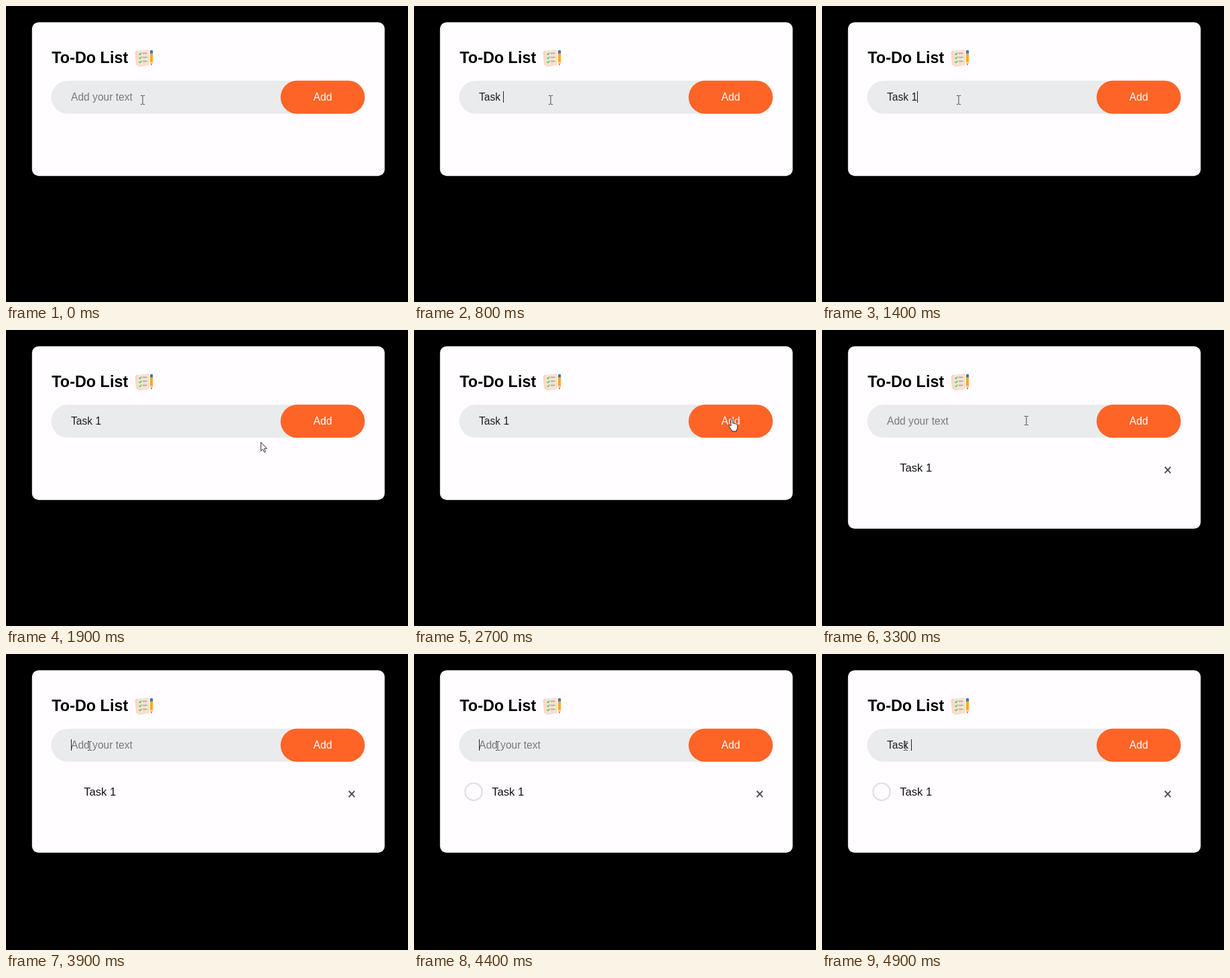
Recreate the animation shown at these times as an HTML page. Size 600 px wide and 441 px high, loop 5000 ms.

```html
<!DOCTYPE html>
<html lang="en">
<head>
<meta charset="utf-8">
<title>To-Do List</title>
<style>
  html, body { margin: 0; width: 100%; height: 100%; overflow: hidden; background: #000; }
  svg { display: block; width: 600px; height: 441px; }
  text { font-family: "Liberation Sans", Arial, sans-serif; font-size: 15.6px; white-space: pre; }
  .title { font-size: 23.4px; font-weight: bold; }
  .task { font-size: 16.6px; fill: #111; }
  .close { font-size: 21.4px; fill: #484848; stroke: #484848; stroke-width: .3; text-anchor: middle; }
  .button { fill: #fff; text-anchor: middle; }
</style>
</head>
<body>
<svg viewBox="0 0 600 441" xmlns="http://www.w3.org/2000/svg">
  <rect width="600" height="441"/>
  <rect id="card" x="38.8" y="24.2" width="526.4" height="229" rx="9.8" fill="#fffdff"/>
  <text class="title" x="68.3" y="85">To-Do List</text>

  <g id="icon">
    <path d="M193 68.5 196 66v21l-2 .5z" fill="#f6c3b2"/>
    <path d="M194 67.5 211.5 65q2 0 2.2 2V86q0 2-2 2.4L198 90.2 194 87z" fill="#fbd9c9"/>
    <path d="M197 67.3 212 65.6V87L197 88.2z" fill="#fce3d4"/>
    <g fill="none" stroke="#5ccb69" stroke-width="1.7">
      <path d="M198.4 71l1.5 1.5 2.6-3M198.4 77l1.5 1.5 2.6-3M198.4 83l1.5 1.5 2.6-3"/>
    </g>
    <g fill="none" stroke="#8b8580" stroke-width="1.1">
      <path d="M204 70.3h6.8M204 76.3h6.8M204 82.3h6.8"/>
    </g>
    <g stroke="#d8c4b8" stroke-width=".7">
      <path d="M204 72.5h5M204 78.5h5M204 84.5h5"/>
    </g>
    <path d="M215 70h4.2v13.3l-2.1 5.2-2.1-5.2z" fill="#f7a928"/>
    <path d="M215 83.3h4.2l-2.1 5.2z" fill="#f3cda5"/>
    <path d="M216.3 86.5h1.6l-.8 2z" fill="#333"/>
    <path d="M215 67.3q0-1.5 2.1-1.5t2.1 1.5v3.2H215z" fill="#2f78b7"/>
  </g>

  <rect x="67.6" y="111.2" width="467.9" height="49.3" rx="24.6" fill="#eaebed"/>
  <text id="field" x="97" y="141.1"></text>
  <rect id="caret" y="127" width="1" height="17" fill="#222"/>
  <rect x="409.8" y="111.2" width="125.7" height="49.3" rx="24.6" fill="#ff6427"/>
  <text class="button" x="472.7" y="141.1">Add</text>

  <g id="item">
    <circle id="check" cx="89" cy="205.3" r="12.7" fill="none" stroke="#dddce2" stroke-width="2"/>
    <text class="task" x="116.3" y="211.3">Task 1</text>
    <text class="close" x="516" y="216">×</text>
  </g>

  <g id="pointer" stroke-linejoin="round">
    <path id="beam" d="M-3-6.5h2.2L0-5.7.8-6.5H3M0-5.7V5.7M-3 6.5h2.2L0 5.7l.8.8H3" fill="none" stroke="#4a4a4a" stroke-width="1"/>
    <path id="arrow" d="M.5.3v12.9l3-2.8 2 4.6 2-.9-2-4.4h4z" fill="#fff" stroke="#333" stroke-width="1"/>
    <path id="hand" d="M-1.5 1.5q0-1.4 1.4-1.4t1.4 1.4v5q2.2-.7 2.6.6 2-.5 2.4.9 2-.1 2 1.9v3.3q0 1.6-1.5 3.2v2h-7v-1.6q-1.8-1.9-3-4.3-2.1-2.6-1.3-3.4 1.1-1 3 1.4z" fill="#fff" stroke="#222" stroke-width="1"/>
  </g>
</svg>

<script>
const LOOP = 5000, TICK = 100, FIELD_X = 97;
const ADDED = 2800, CHECK_SHOWN = 4300;

// [time, field text]
const typing = [
  [0, ""], [400, "T"], [500, "Ta"], [600, "Tas"], [700, "Task"], [800, "Task "], [1000, "Task 1"],
  [ADDED, ""], [4500, "T"], [4600, "Ta"], [4700, "Tas"], [4800, "Task"], [4900, "Task "]
];

// [from, to] while the caret is lit
const caretOn = [[200, 1500], [2000, 2400], [3700, 4200], [4400, 5000]];

// [time, x, y] of the pointer's hot spot
const path = [
  [0, 204, 140], [1400, 204, 140], [1600, 262, 147], [1800, 352, 159], [1900, 380, 167],
  [2100, 402, 165], [2400, 474.5, 132.5], [3000, 474.5, 132.5],
  [3200, 390, 134], [3400, 220, 136], [3600, 125, 137], [5000, 125, 137]
];

const $ = id => document.getElementById(id);
const show = (id, on) => $(id).setAttribute("visibility", on ? "visible" : "hidden");

const pen = document.createElement("canvas").getContext("2d");
pen.font = '15.6px "Liberation Sans", Arial, sans-serif';

function pointAt(t) {
  const i = path.findIndex(p => p[0] > t);
  const [t0, x0, y0] = path[i - 1], [t1, x1, y1] = path[i];
  const k = (t - t0) / (t1 - t0);
  return [x0 + (x1 - x0) * k, y0 + (y1 - y0) * k];
}

function cursorAt(x, y) {
  if (y < 111 || y > 160.5) return "arrow";
  return x > 410 ? "hand" : "beam";
}

function render(t) {
  const text = typing.filter(s => s[0] <= t).pop()[1];
  $("field").textContent = text || "Add your text";
  $("field").setAttribute("fill", text ? "#1d1d1d" : "#7b7b7d");
  $("caret").setAttribute("x", Math.round(FIELD_X + pen.measureText(text).width));
  show("caret", caretOn.some(([a, b]) => t >= a && t < b));

  $("card").setAttribute("height", t < ADDED ? 229 : 271.8);
  $("item").style.display = t < ADDED ? "none" : "";
  show("check", t >= CHECK_SHOWN);

  const [x, y] = pointAt(t), kind = cursorAt(x, y);
  $("pointer").setAttribute("transform", `translate(${x} ${y})`);
  for (const id of ["beam", "arrow", "hand"]) show(id, id === kind);
}

const start = performance.now();
function frame() {
  const t = (performance.now() - start) % LOOP;
  render(Math.floor(t / TICK) * TICK);
  requestAnimationFrame(frame);
}
frame();
</script>
</body>
</html>
```
